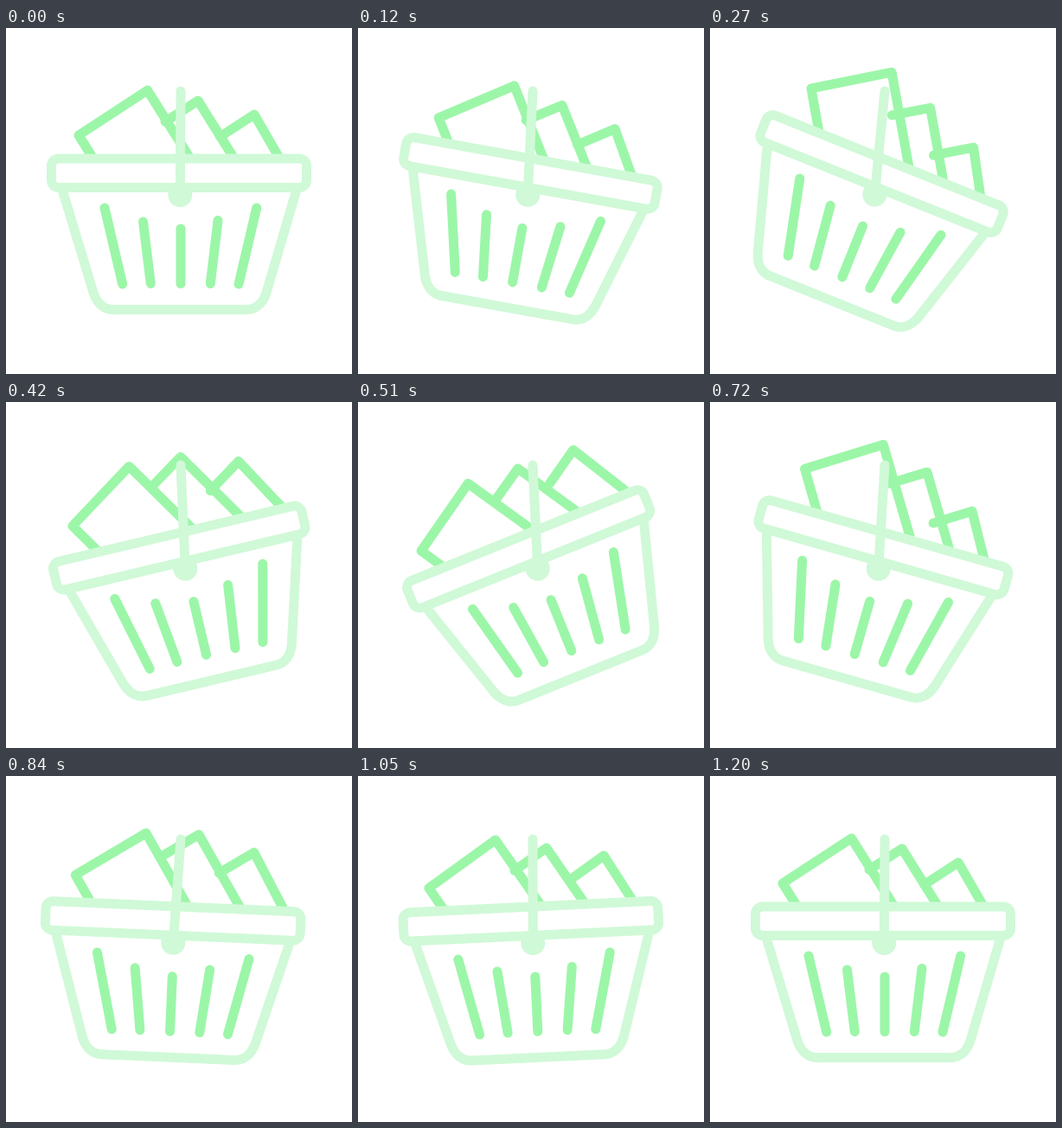
An HTML page that plays this animation: 400 by 400 pixels, repeating every 1260 ms.

```html
<!DOCTYPE html>
<html lang="en">
<head>
<meta charset="utf-8">
<title>Swinging basket</title>
<style>
  html, body { margin: 0; width: 100%; height: 100%; overflow: hidden; background: #fff; }
  svg { display: block; width: 100%; height: 100%; }
  .line { fill: none; stroke-width: 11; stroke-linecap: round; stroke-linejoin: round; }
  .pale { stroke: #d0f9d7; }
  .green { stroke: #9cf6a8; }
</style>
</head>
<body>
<svg viewBox="0 0 400 400">
  <!-- basket drawn around its hinge at 201.3,193 -->
  <g id="basket">
    <g class="line green">
      <path class="doc" d="M280.7 178L222 84L184 108.4"/>
      <path class="doc" d="M332 178L287 100L247.6 125.6"/>
      <path class="doc" d="M117.7 178L84 124L163.5 72L230 178"/>
    </g>
    <g class="line pale">
      <path d="M66 190L101 306C105 318 113 325.5 124 325.5H278C289 325.5 297 318 301 306L335 190"/>
      <rect x="52.5" y="151" width="295" height="33.5" rx="8.5" style="fill:#fff"/>
    </g>
    <path class="line green" d="M114 208L134.7 296M158.5 224L167.3 295.5M202 232V295.5M245 222.5L236.3 295.5M289.7 208L269 296"/>
  </g>
  <path id="handle" class="line pale"/>
  <circle id="hub" r="14" fill="#d0f9d7"/>
</svg>
<script>
const STEP = 30, LAST = 40, LOOP = 1260;
const HINGE = { x: 201.3, y: 193 }, TOP = { x: 202, y: 73 }, REACH = 120;

// key poses as [step, value]
const TILT = [[0, 0], [8.5, 22.5], [14, -13.3], [17, -22], [20, -12.9], [24.6, 17], [28, 2.5], [31.5, -9], [35, -2.7], [40, 0]];
const SWAY = [[0, 0], [8.5, -11.2], [14, 6], [16, 7], [20, 2], [26.5, -9.5], [28, -8], [35, 1], [40, 0]];
// step at the top of each hop, in the order the sheets are drawn
const HOPS = [[12.9, 26.5], [16.5, 30.1], [10.4, 23.2]];
const HOP_SPAN = 14, HOP_HEIGHT = 19.3;

const el = id => document.getElementById(id);
const docs = document.querySelectorAll(".doc");

const secant = (k, i) => (k[i + 1][1] - k[i][1]) / (k[i + 1][0] - k[i][0]);

function slope(k, i) {
  if (i === 0 || i === k.length - 1) return 0;
  const a = secant(k, i - 1), b = secant(k, i);
  return a * b <= 0 ? 0 : (a + b) / 2;
}

// smooth curve through the keys, flat at each turning point
function curve(k, f) {
  let i = 0;
  while (i < k.length - 2 && f > k[i + 1][0]) i++;
  const [x0, y0] = k[i], [x1, y1] = k[i + 1];
  const w = x1 - x0, u = (f - x0) / w, v = 1 - u;
  return y0 * v * v * (1 + 2 * u) + y1 * u * u * (3 - 2 * u)
    + w * u * v * (slope(k, i) * v - slope(k, i + 1) * u);
}

function hop(peaks, f) {
  return Math.max(...peaks.map(p => {
    const d = Math.abs(f - p) / HOP_SPAN;
    return d < 0.5 ? HOP_HEIGHT * Math.cos(Math.PI * d) ** 2 : 0;
  }));
}

function draw(ms) {
  const f = Math.min(LAST, Math.floor((ms % LOOP) / STEP));
  const dx = curve(SWAY, f);
  const x = HINGE.x + dx, y = TOP.y + Math.sqrt(REACH * REACH - dx * dx);

  el("basket").setAttribute("transform",
    `translate(${x} ${y}) rotate(${curve(TILT, f)}) translate(${-HINGE.x} ${-HINGE.y})`);
  docs.forEach((doc, i) => {
    const h = hop(HOPS[i], f);
    doc.setAttribute("transform", `translate(${h * 0.2} ${-h})`);
  });
  el("handle").setAttribute("d", `M${TOP.x} ${TOP.y}L${x} ${y}`);
  el("hub").setAttribute("cx", x);
  el("hub").setAttribute("cy", y);
}

const start = performance.now();
function tick() {
  draw(performance.now() - start);
  requestAnimationFrame(tick);
}
tick();
</script>
</body>
</html>
```
